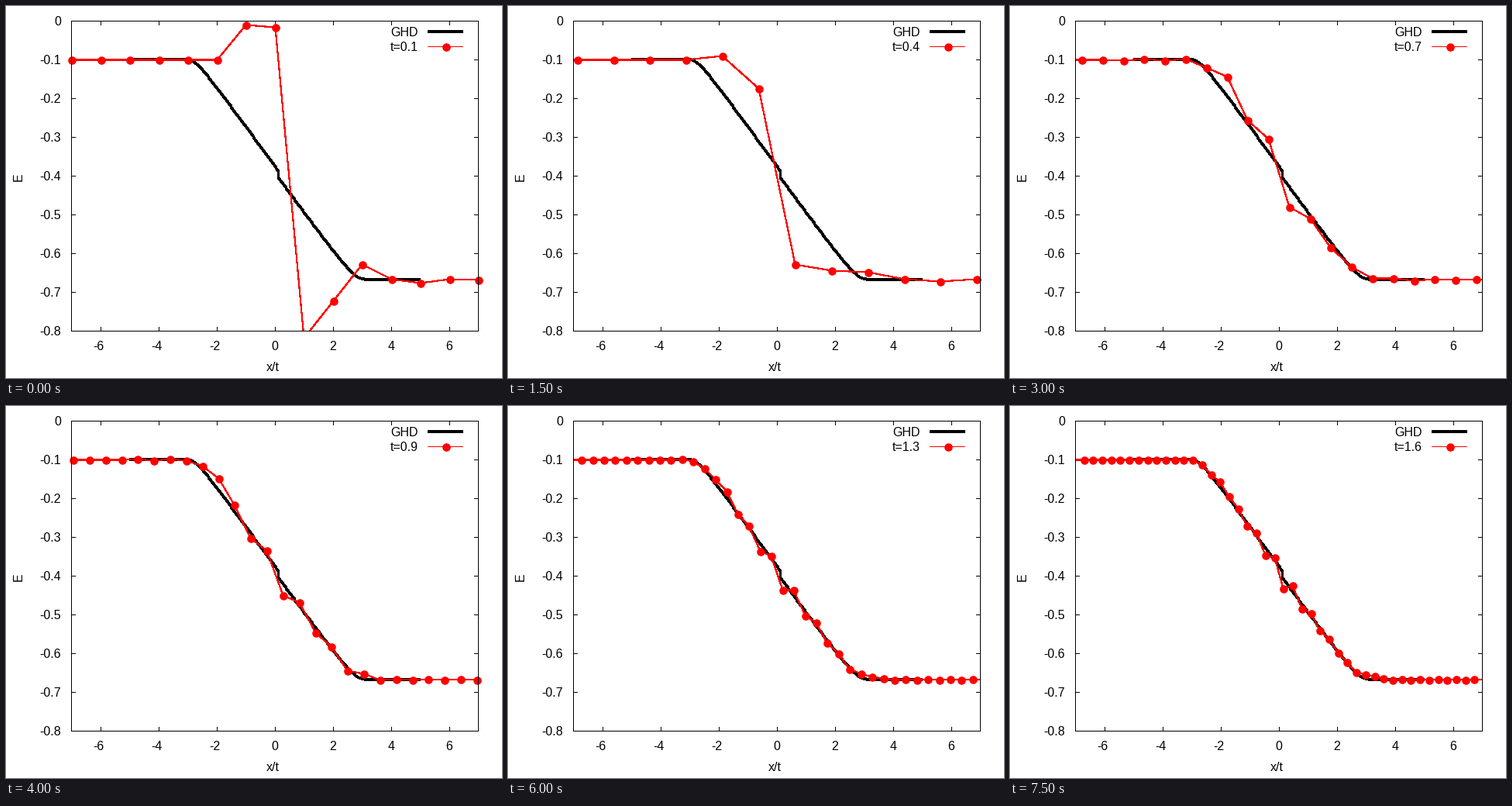
Recreate the animation shown at these times as a matplotlib script. Size 640 px wide and 480 px high, loop 8000 ms.

```python
import numpy as np
import matplotlib.pyplot as plt
from matplotlib.animation import FuncAnimation
from matplotlib.patches import Rectangle

W, H, DPI = 640, 480, 80
PX = 72 / DPI  # points per pixel
LEFT, RIGHT, TOP, BOTTOM = 84, 609, 19, 419
E_LEFT, E_RIGHT, JUMP = -0.1, -0.667, 0.13

plt.rcParams["font.family"] = "Liberation Sans"
plt.rcParams["font.size"] = 16 * PX

fig = plt.figure(figsize=(W / DPI, H / DPI), dpi=DPI, facecolor="white")
ax = fig.add_axes([0, 0, 1, 1], xlim=(0, W), ylim=(H, 0))
ax.axis("off")


def to_px(xi, e):
    """Centres of the pixels that hold the data points."""
    x = LEFT + (RIGHT - LEFT) * (np.asarray(xi) + 7) / 14
    y = TOP + (BOTTOM - TOP) * np.asarray(e) / -0.8
    return np.floor(x + 0.5) + 0.5, np.floor(y + 0.5) + 0.5


def ramp(s, slope, bend):
    """Zero for s < 0, then a bend into a straight slope."""
    s = np.maximum(s, 0)
    return slope * (np.hypot(s, bend) - bend)


def ghd(xi):
    return np.where(xi <= JUMP,
                    E_LEFT - ramp(xi + 3, 0.1032, 0.35),
                    E_RIGHT + ramp(3.08 - xi, 0.103, 0.45))


def bell(x, centre, width):
    return np.exp(-((x - centre) / width) ** 2)


def profile(t):
    """Energy on each site: a quench at the junction that relaxes to GHD."""
    site = np.arange(-30, 30) + 0.5
    xi = site * 0.5 / t
    quench = np.where(site < 0, E_LEFT, E_RIGHT) + np.interp(
        site, np.arange(-2.5, 6),
        [0, 0.094, 0.09, -0.161, -0.058, 0.041, 0.002, -0.009, 0])
    early = bell(t, 0, 0.45)
    stagger = -0.022 * np.cos(np.pi * (site - 0.5)) * np.exp(-abs(site - 0.5) / 3)
    ripple = (stagger - 0.01 * bell(site, -1, 1)
              + 0.03 / t ** 2 * bell(xi, -1.93, 0.45)
              + 0.012 * bell(xi, 3.1, 0.35))
    e = early * quench + (1 - early) * ghd(xi) + (1 - early) ** 4 * ripple
    # the first profile is plotted against the bare site number
    return (site + 0.5 if t < 0.15 else xi), e


def stroke(x, y, color="black", width=1, **kw):
    return ax.plot(x, y, color=color, lw=width * PX, antialiased=False, snap=False,
                   solid_capstyle="butt", **kw)[0]


def dots(x, y):
    return ax.scatter(x, y, s=(10.6 * PX) ** 2, c="red", linewidths=0,
                      antialiased=False, zorder=5, clip_on=False)


def put(x, y, s, ha="right", **kw):
    return fig.text(x / W, 1 - y / H, s, ha=ha, **{"va": "baseline", **kw})


# border, mirrored ticks and labels
x0, x1, y0, y1 = LEFT + 0.5, RIGHT + 0.5, TOP + 0.5, BOTTOM + 0.5
stroke([x0, x1, x1, x0, x0], [y0, y0, y1, y1, y0], zorder=6)
for v in range(-6, 7, 2):
    x, _ = to_px(v, 0)
    stroke([x, x], [y0, y0 + 5])
    stroke([x, x], [y1, y1 - 5])
    put(351.5 + 37.5 * v, 444, str(v))
for k in range(9):
    _, y = to_px(0, -k / 10)
    stroke([x0, x0 + 5], [y, y])
    stroke([x1, x1 - 5], [y, y])
    put(71, 25 + 50 * k, f"-0.{k}" if k else "0")
put(344.5, 471, "x/t", "center")
put(16, 220.5, "E", "center", rotation=90, va="center")

# legend
put(532, 39, "GHD")
label = put(532, 58, "")
stroke([544, 590], [33, 33], width=2.3)
stroke([544, 590], [52.5, 52.5], "red")
dots([567.5], [52.5])

# curves
xs = np.r_[np.linspace(-5, JUMP, 200), np.linspace(JUMP + 1e-6, 5, 200)]
cx, cy = to_px(xs, ghd(xs))
stroke(cx, cy - 0.5, width=2.3, zorder=3)
line = stroke([], [], "red", 1.15, zorder=4)
line.set_clip_path(Rectangle((x0, y0), x1 - x0, y1 - y0, transform=ax.transData))
marks = dots([], [])


def update(i):
    t = (i + 1) / 10
    xi, e = profile(t)
    x, y = to_px(xi, e)
    line.set_data(x, y)
    inside = (abs(xi) <= 7.001) & (e >= -0.8)
    marks.set_offsets(np.column_stack([x, y])[inside])
    label.set_text(f"t={t:.1f}")
    return line, marks, label


anim = FuncAnimation(fig, update, frames=16, interval=500, repeat=True, repeat_delay=0)
plt.show()
```
